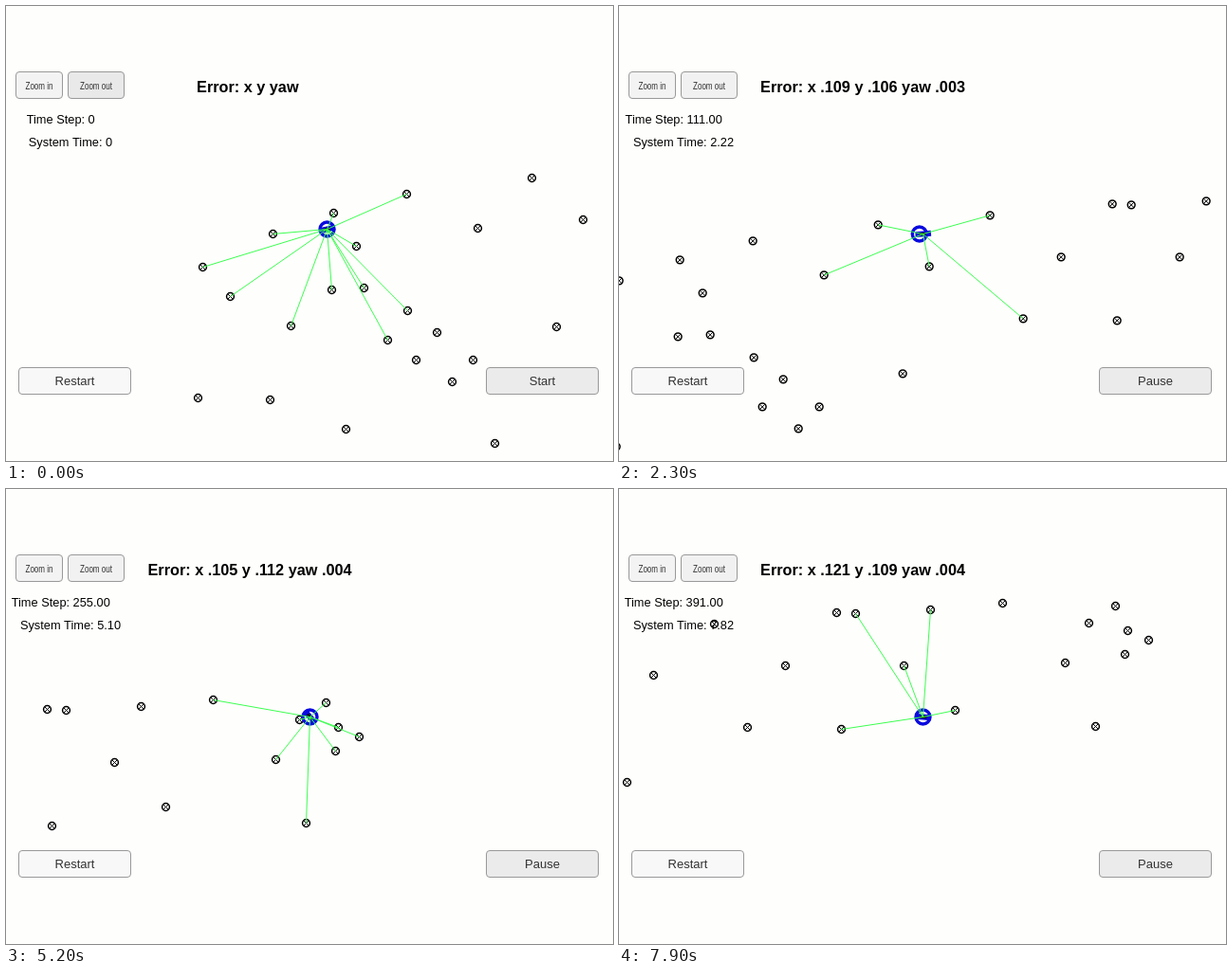
An HTML page with a canvas for the animation above (8 s loop, 640 by 480 pixels).

```html
<!DOCTYPE html>
<html lang="en">
<head>
<meta charset="utf-8">
<title>Localization simulator</title>
<style>
  html, body { margin: 0; width: 100%; height: 100%; overflow: hidden; background: #fefefc; }
  canvas { display: block; }
</style>
</head>
<body>
<canvas id="stage" width="640" height="480"></canvas>
<script>
const ctx = document.getElementById('stage').getContext('2d');
const LOOP = 8000, FPS = 15, RANGE = 140;
const HOME = { x: 320, y: 240 };
const BLUE = '#0a0adf', FONT = '"Liberation Sans", Arial, sans-serif';

// The map, in world pixels: each landmark is placed once, the camera does the rest.
const landmarks = [
  [554, 181], [608, 225], [497, 234], [422, 198], [345, 218], [281, 240], [369, 253], [207, 275],
  [236, 306], [343, 299], [377, 297], [423, 321], [300, 337], [402, 352], [454, 344], [432, 373],
  [492, 373], [470, 396], [580, 338], [202, 413], [278, 415], [358, 446], [515, 461], [672, 171],
  [747, 215], [707, 280], [801, 159], [821, 160], [900, 156], [976, 149], [1067, 170], [1042, 212],
  [1074, 279], [926, 262], [872, 215], [806, 282], [1095, 152], [1108, 178], [1130, 188], [1105, 203]
];

// Waypoints of the drive, joined by a smooth curve
const waypoints = [
  { k: 2, x: 338, y: 235, ex: .118, ey: .094 },
  { k: 23, x: 477, y: 203, ex: .114, ey: .100 },
  { k: 48, x: 753, y: 179, ex: .104, ey: .112 },
  { k: 66, x: 975, y: 162, ex: .105, ey: .113 },
  { k: 78, x: 1078, y: 167, ex: .105, ey: .112 },
  { k: 98, x: 1077, y: 284, ex: .112, ey: .108 },
  { k: 119, x: 892, y: 269, ex: .121, ey: .109 }
];

// Cubic Hermite interpolation of one waypoint property
function sample(k, key) {
  const last = waypoints.length - 1;
  let i = 0;
  while (i < last - 1 && k >= waypoints[i + 1].k) i++;
  const a = waypoints[i], b = waypoints[i + 1];
  const h = b.k - a.k, u = (k - a.k) / h;
  const slope = j => {
    const p = waypoints[Math.max(j - 1, 0)], n = waypoints[Math.min(j + 1, last)];
    return (n[key] - p[key]) / (n.k - p.k);
  };
  return (1 + 2 * u) * (1 - u) ** 2 * a[key] + u * u * (3 - 2 * u) * b[key] +
    h * u * (1 - u) * ((1 - u) * slope(i) - u * slope(i + 1));
}

function line(x1, y1, x2, y2, color, width) {
  ctx.strokeStyle = color;
  ctx.lineWidth = width;
  ctx.beginPath();
  ctx.moveTo(x1, y1);
  ctx.lineTo(x2, y2);
  ctx.stroke();
}

function ring(x, y, radius, color, width) {
  ctx.strokeStyle = color;
  ctx.lineWidth = width;
  ctx.beginPath();
  ctx.arc(x, y, radius, 0, 2 * Math.PI);
  ctx.stroke();
}

function landmark(x, y) {
  ring(x, y, 3.9, '#000', 1.5);
  line(x - 2.5, y - 2.5, x + 2.5, y + 2.5, '#000', 1);
  line(x - 2.5, y + 2.5, x + 2.5, y - 2.5, '#000', 1);
}

function vehicle({ x, y }, heading, lag) {
  ring(x - lag, y, 7.5, BLUE, 3.4);
  ctx.save();
  ctx.translate(x, y);
  ctx.rotate(heading);
  ctx.fillStyle = BLUE;
  ctx.fillRect(-8, -3, 16.5, 6);
  ctx.fillStyle = '#111';
  ctx.fillRect(-4, -1.5, 7, 3);
  ctx.restore();
}

function label(text, x, y, size, { color = '#000', weight = '', stretch = 1 } = {}) {
  ctx.save();
  ctx.translate(x, y);
  ctx.scale(stretch, 1);
  ctx.font = `${weight} ${size}px ${FONT}`;
  ctx.textAlign = 'center';
  ctx.fillStyle = color;
  ctx.fillText(text, 0, 0);
  ctx.restore();
}

function button(text, x, y, w, fill, size = 13, stretch = 1) {
  ctx.beginPath();
  ctx.roundRect(x, y, w, 28, 3.5);
  ctx.fillStyle = fill;
  ctx.fill();
  ctx.strokeStyle = '#999';
  ctx.lineWidth = 1;
  ctx.stroke();
  label(text, x + w / 2, y + 14 + size * .36, size, { color: '#323232', stretch });
}

function drawWorld(k, started) {
  const now = Math.max(k, 2);
  const car = { x: sample(now, 'x'), y: sample(now, 'y') };
  const vx = sample(now + .5, 'x') - sample(now - .5, 'x');
  const vy = sample(now + .5, 'y') - sample(now - .5, 'y');
  const camera = started ? car : HOME;

  ctx.save();
  ctx.translate(HOME.x - camera.x + .5, HOME.y - camera.y + .5);
  for (const [x, y] of landmarks) landmark(x, y);
  // At high speed the estimate trails behind the car.
  vehicle(car, Math.atan2(vy, vx), Math.max(0, vx - 8.5) * 1.3);
  for (const [x, y] of landmarks)
    if (Math.hypot(x - car.x, y - car.y) < RANGE) line(car.x, car.y, x, y, '#3cff50', 1);
  ctx.restore();
}

function drawInterface(k, started) {
  const step = Math.floor(k * 10 / 3 - 5 + 1e-6);
  const short = v => v.toFixed(3).slice(1);
  button('Zoom in', 10.5, 69.5, 49, '#f3f3f3', 11.5, .7);
  button('Zoom out', 65.5, 69.5, 59, started ? '#f1f1f1' : '#e9e9e9', 11.5, .7);
  button('Restart', 13.5, 381.5, 118, '#f8f8f8');
  button(started ? 'Pause' : 'Start', 506.5, 381.5, 118, '#ebebeb');

  label(`Time Step: ${started ? step.toFixed(2) : 0}`, 57.7, 124, 12.8);
  label(`System Time: ${started ? (step / 50).toFixed(2) : 0}`, 68, 148, 12.8);
  const error = started
    ? `Error: x ${short(sample(k, 'ex'))} y ${short(sample(k, 'ey'))} yaw ${k < 60 ? '.003' : '.004'}`
    : 'Error: x y yaw';
  label(error, started ? 257 : 254.8, 91, 16.25, { weight: 'bold' });
}

function draw(now) {
  // Steps run at 15 per second, shown on a 50 ms grid.
  const tick = Math.floor(now % LOOP / 50) * 50;
  const k = Math.floor((tick + 49.9) * FPS / 1000);
  const started = k >= 2;
  ctx.fillStyle = '#fefefc';
  ctx.fillRect(0, 0, 640, 480);
  drawWorld(k, started);
  drawInterface(k, started);
}

const start = performance.now();
function frame() {
  draw(performance.now() - start);
  requestAnimationFrame(frame);
}
frame();
</script>
</body>
</html>
```
